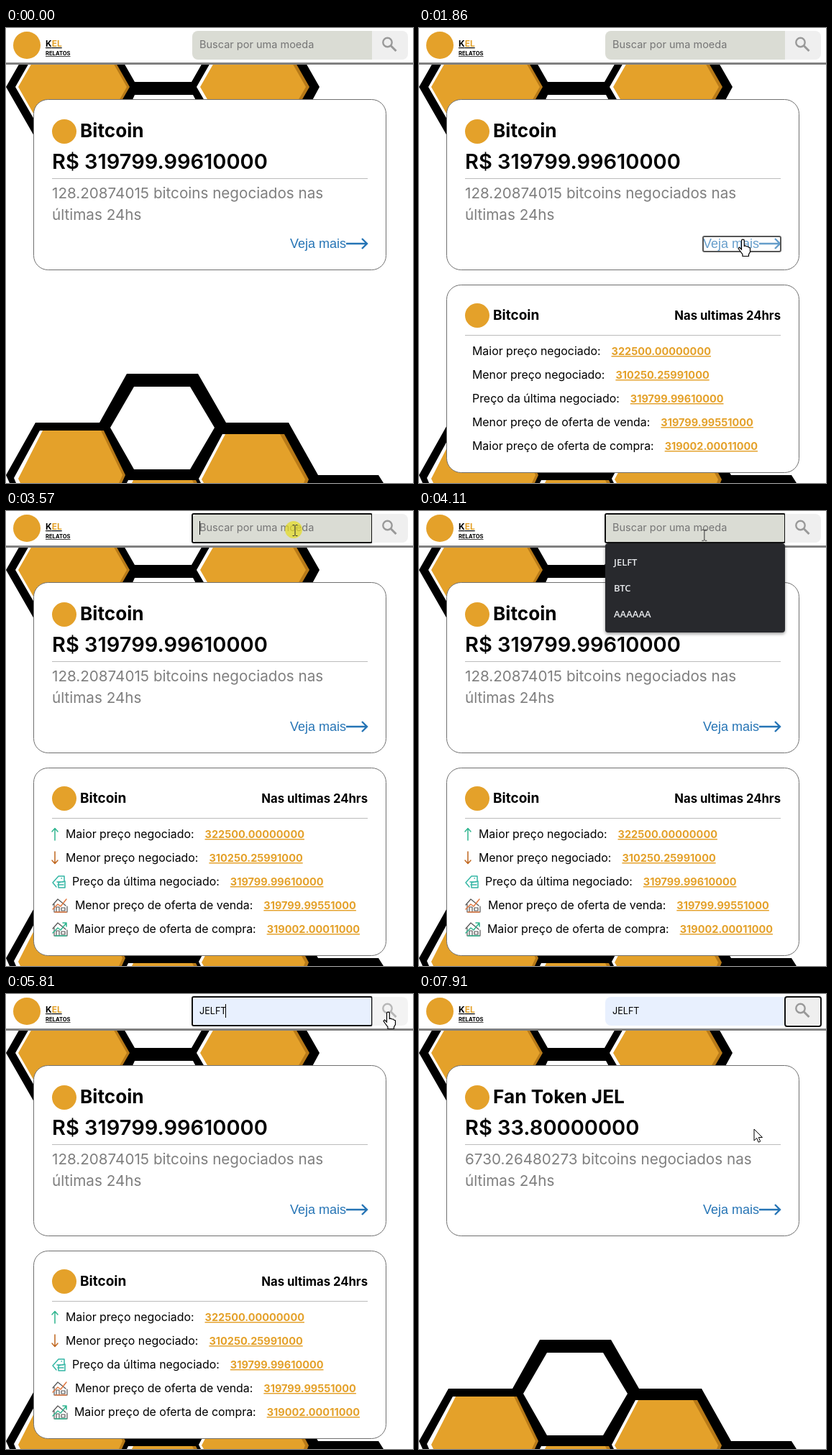
Animation of 566 by 633 pixels, one loop 7990 ms. Source, as an HTML page:

```html
<!DOCTYPE html>
<html lang="pt-BR">
<head>
<meta charset="utf-8">
<title>Cotações</title>
<style>
  html, body { margin: 0; width: 100%; height: 100%; overflow: hidden; background: #fff; }
  svg { display: block; width: 566px; height: 633px; }
  text { font-family: Inter, sans-serif; white-space: pre; }
  .title { font-size: 26.2px; font-weight: 650; }
  .price { font-size: 29px; font-weight: 600; }
  .volume { font-size: 20.65px; fill: #7f7f7f; }
  .row { font-size: 15.9px; }
  .value { font-size: 14.5px; font-weight: 700; fill: #e4a12a; text-decoration: underline; }
  .menu text { font: 600 13px "Open Sans", sans-serif; fill: #e8eaed; }
  .gold { fill: #e4a12a; }
  .shade { fill: #b87a18; }
  .card { fill: #fff; stroke: #707070; }
  .rule { stroke: #bbb; }
  .line { fill: none; stroke-width: 1.5; stroke-linejoin: round; stroke-linecap: round; }
</style>
</head>
<body>
<svg viewBox="0 0 566 633">
  <!-- honeycomb, top -->
  <path d="M20 47L0 82 43 157H150L179 93H260L280 130H410L436 82 416 47H274L258 75H179L163 47Z"/>
  <path fill="#fff" d="M33 47L13 82 46 139H80V47ZM285 47L265 82 290 125H320V47Z"/>
  <path class="shade" d="M60 47H152L172 82 150 120H60ZM310 47H402L422 82 400 120H310Z"/>
  <path class="gold" d="M37 47L17 82 45 131H140L168 82 148 47ZM290 47L270 82 295 125H392L417 82 397 47Z"/>
  <!-- honeycomb, bottom -->
  <path d="M168 481H267L306 549H393L434 622H518L525 633H5L0 622 41 549H130Z"/>
  <path fill="#fff" d="M178 499H256L290 556 256 614H178L145 556ZM47 560H70V633H14L11 626ZM301 565H320V633H271L268 627ZM170 629H190V633H168Z"/>
  <path class="shade" d="M70 560H136L166 622 161 633H70ZM320 565H387L421 628 419 633H320ZM190 629H264L266 633H190Z"/>
  <path class="gold" d="M51 560H132L162 622 157 633H20L17 627ZM305 565H381L416 628 414 633H275L272 628ZM177 629H259L261 633H175Z"/>

  <!-- header -->
  <path fill="#fff" d="M0 0H566V48H0Z"/>
  <path fill="#808080" d="M0 48H566V51H0Z"/>
  <circle class="gold" cx="29" cy="24" r="19"/>
  <text x="55" y="26" font-size="12" font-weight="700" text-decoration="underline">K<tspan class="gold">EL</tspan></text>
  <text x="55" y="38" font-size="7.6" font-weight="700" text-decoration="underline">RELATOS</text>
  <path id="field" d="M509 4H267a8 8 0 0 0-8 8V36a8 8 0 0 0 8 8H509Z"/>
  <text id="query" x="269" y="28"></text>
  <path id="caret" stroke="#000" d="M0 14V33"/>
  <rect id="fieldRing" x="259" y="4" width="250" height="40" rx="2" fill="none" stroke="#101010" stroke-width="2"/>
  <g id="button">
    <path fill="#efefef" d="M509 4H551a8 8 0 0 1 8 8V36a8 8 0 0 1-8 8H509Z"/>
    <g fill="none" stroke="#999" stroke-width="2.4"><circle cx="530.5" cy="20" r="6.2"/><path stroke-width="3" d="M535 24.500L542.500 32"/></g>
    <rect id="buttonRing" x="509" y="4" width="50" height="41" rx="3" fill="none" stroke="#101010" stroke-width="2"/>
  </g>

  <!-- summary card -->
  <rect class="card" x="38.500" y="99.500" width="490" height="237" rx="20"/>
  <circle class="gold" cx="81" cy="144" r="17"/>
  <text id="coin" class="title" x="103" y="152"></text>
  <text id="price" class="price" x="64" y="196"></text>
  <path class="rule" d="M64 209.500H503"/>
  <text id="volume" class="volume" x="64" y="237"></text>
  <text class="volume" x="64" y="267">últimas 24hs</text>
  <g id="link">
    <text x="395" y="306" style="font:18px 'Liberation Sans',sans-serif" fill="#2574b5">Veja mais</text>
    <path fill="none" stroke="#2574b5" stroke-width="2.4" d="M473 300H502M495 293L502 300 495 307"/>
    <rect id="linkRing" x="395" y="290" width="108" height="21" rx="2" fill="none" stroke="#101010" stroke-width="2"/>
  </g>

  <!-- details card -->
  <g id="details">
    <rect class="card" x="38.500" y="357.500" width="490" height="261" rx="20"/>
    <circle class="gold" cx="81" cy="400" r="17"/>
    <text x="103" y="406" font-size="19" font-weight="650">Bitcoin</text>
    <text x="503" y="406" font-size="16.700" font-weight="650" text-anchor="end">Nas ultimas 24hrs</text>
    <path class="rule" d="M64 427.500H503"/>
    <g id="rows"></g>
    <g id="icons" class="line">
      <path stroke="#2fb58f" d="M68 458V442M64 446L68 441.500 72 446"/>
      <path stroke="#c0671f" d="M68 474V490M64 486L68 490.500 72 486"/>
      <path stroke="#35b7a5" d="M70 523L65 517 73 508H81V514M77 511h.5M71 516H80M72 520H80M73 517V524H82V515Z"/>
      <g id="house" stroke="#555" stroke-width="1.200"><path d="M65 548L72 540 83 549M67 547V558H85V550M70 557V551H74V557M77 552H82V556H77Z"/></g>
      <use href="#house" y="33"/>
      <path stroke="#e07840" d="M65 554L72 547 76 550 84 540M68 558H84"/>
      <path stroke="#2fb58f" d="M65 587L72 580 76 583 84 573M79 573H84V578M68 591H84"/>
    </g>
  </g>

  <!-- suggestions -->
  <g id="menu" class="menu">
    <rect x="259" y="45" width="250" height="124" rx="4" fill="#28292d" style="filter:drop-shadow(0 2px 2px #0006)"/>
    <path id="option" fill="#4a4c4f" d="M259 53H509V89H259Z"/>
    <text x="271" y="76">JELFT</text>
    <text x="271" y="112">BTC</text>
    <text x="271" y="148">AAAAAA</text>
  </g>

  <!-- pointer -->
  <g id="pointer">
    <circle id="halo" cx="-2" cy="-1" r="12" fill="#e6dc1e" fill-opacity=".7"/>
    <path id="arrow" fill="#fff" stroke="#000" d="M0 0V16L3.700 12.500 6.100 18.200 8.700 17.100 6.300 11.500H11.500Z"/>
    <path id="hand" fill="#fff" stroke="#000" stroke-width="1.200" d="M-2.500 12V0a1.900 1.900 0 0 1 3.800 0V7.500L3 7 4.700 8 6.500 8 7.800 9.300 9.500 10V15.500L7.500 19V21.500H-1V19L-5 13.500-7 10.500-5.500 9Z"/>
    <path id="beam" fill="none" stroke="#333" d="M-3.500 -7.500H-1L0 -6.500 1 -7.500H3.500M0 -6.500V6.500M-3.500 7.500H-1L0 6.500 1 7.500H3.500"/>
  </g>
</svg>
<script>
const LOOP = 7990;
const el = id => document.getElementById(id);
const show = (id, on) => el(id).style.display = on ? '' : 'none';
const clamp = x => Math.min(1, Math.max(0, x));
const ramp = (t, a, b) => clamp((t - a) / (b - a));

const rows = [
  ['Maior preço negociado:', '322500.00000000', 83],
  ['Menor preço negociado:', '310250.25991000', 83],
  ['Preço da última negociado:', '319799.99610000', 92],
  ['Menor preço de oferta de venda:', '319799.99551000', 96],
  ['Maior preço de oferta de compra:', '319002.00011000', 95],
];
el('rows').innerHTML = rows.map(([label, value], i) =>
  `<text class="row" x="74" y="${455 + 33 * i}">${label}<tspan class="value" dx="15">${value}</tspan></text>`).join('');

// start, end, number of steps, destination
const moves = [
  [400, 1160, 11, 451, 296],
  [2570, 3270, 10, 402, 27],
  [4030, 4490, 7, 376, 61],
  [5270, 5810, 8, 532, 27],
  [7760, 7910, 3, 466, 188],
];

function pointerAt(t) {
  let x = 572, y = 640;
  for (const [start, end, steps, toX, toY] of moves) {
    if (t < start) break;
    const step = Math.floor((t - start) / (end - start) * (steps - 1) + 1e-6) + 1;
    const p = clamp(step / steps), ease = p * p * (3 - 2 * p);
    x += (toX - x) * ease;
    y += (toY - y) * ease;
  }
  return [x, y];
}

function draw(t) {
  const within = (a, b) => t >= a && t < b;
  const [x, y] = pointerAt(t);
  const inHeader = y > 3 && y < 45;
  const overButton = inHeader && x > 509 && x < 560;
  const overField = inHeader && x > 258 && x <= 509;
  const overLink = x > 394 && x < 504 && y > 289 && y < 312;

  el('pointer').setAttribute('transform', `translate(${x} ${y})`);
  show('hand', overButton || overLink);
  show('beam', overField);
  show('arrow', !overButton && !overLink && !overField);
  show('halo', within(1710, 1860) || within(3570, 3800) || within(4660, 4740) || within(5970, 6130));

  el('link').style.opacity = 1 - 0.3 * (ramp(t, 1160, 1400) - ramp(t, 2570, 2800));
  show('linkRing', within(1860, 3570));
  show('details', within(1860, 6130));
  const iconsLoaded = t >= 2170;
  show('icons', iconsLoaded);
  [...el('rows').children].forEach((row, i) => row.setAttribute('x', iconsLoaded ? rows[i][2] : 74));

  const optionHover = within(4030, 4740) && y > 53;
  const filled = optionHover || t >= 4740;
  show('menu', within(3650, 4740));
  show('option', optionHover);
  el('field').setAttribute('fill', filled ? '#e8f0fe' : '#dadcd4');
  const query = el('query');
  query.textContent = filled ? 'JELFT' : 'Buscar por uma moeda';
  query.setAttribute('fill', filled ? '#000' : '#757575');
  query.setAttribute('font-size', filled ? 12.6 : 14.5);
  show('fieldRing', within(3570, 5970));
  const chosen = t >= 4740;
  const blink = chosen ? (t - 4740) / 535 : (t - 3570) / 460;
  show('caret', within(3570, 5970) && Math.floor(blink) % 2 === 0);
  el('caret').setAttribute('transform', `translate(${chosen ? 305.5 : 269.5} 0)`);

  el('button').style.opacity = overButton ? 0.7 : 1;
  show('buttonRing', t >= 6050);

  const found = t >= 6290;
  el('coin').textContent = found ? 'Fan Token JEL' : 'Bitcoin';
  el('price').textContent = found ? 'R$ 33.80000000' : 'R$ 319799.99610000';
  el('volume').textContent = (found ? '6730.26480273' : '128.20874015') + ' bitcoins negociados nas';
}

const began = performance.now();
function tick() {
  draw((performance.now() - began) % LOOP);
  requestAnimationFrame(tick);
}
tick();
</script>
</body>
</html>
```
